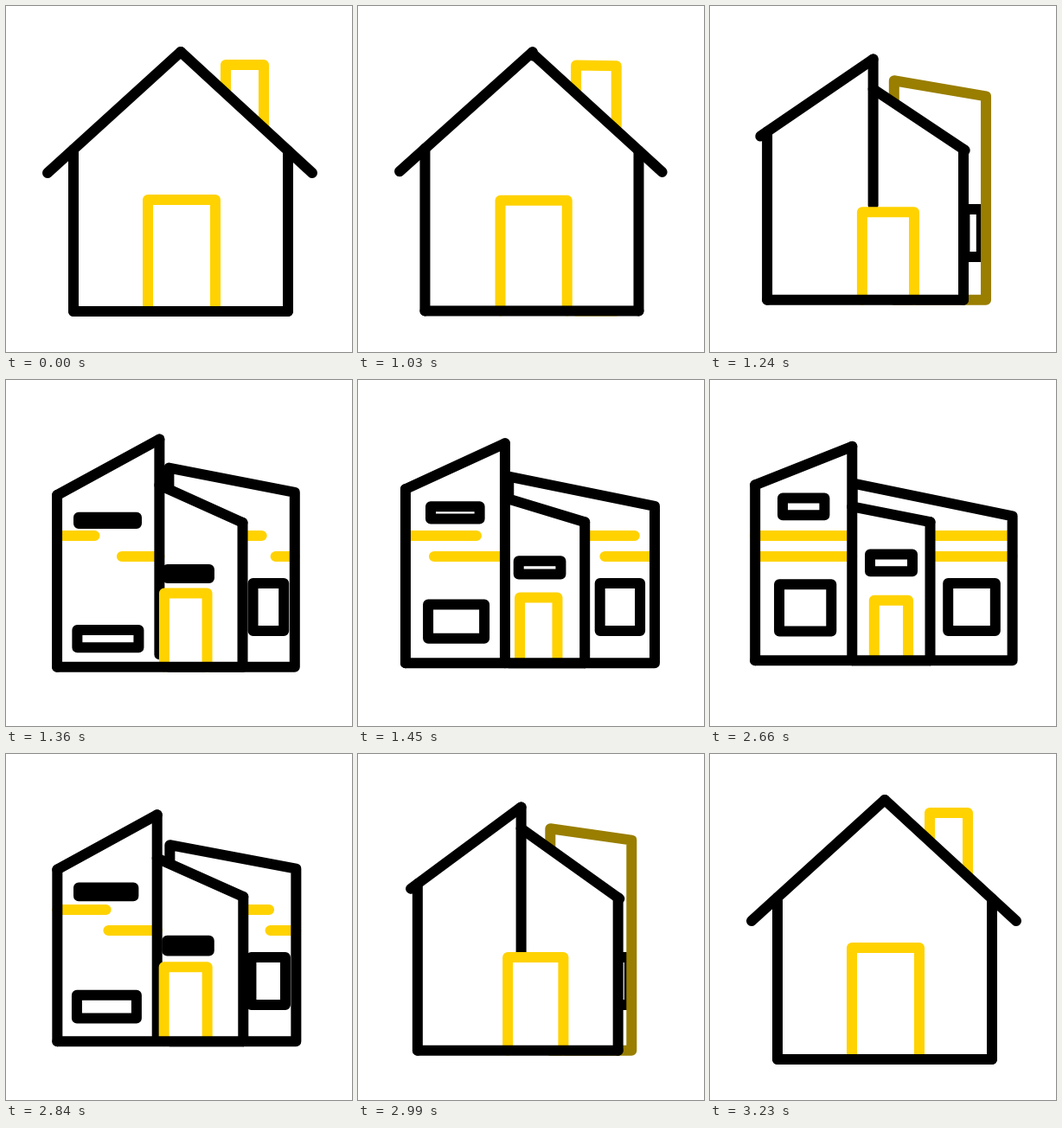
Write an HTML page that moves like this. It is 400 px wide and 400 px high and loops after 3260 ms.

```html
<!DOCTYPE html>
<html lang="en">
<head>
<meta charset="utf-8">
<title>House morph</title>
<style>
html, body { margin: 0; width: 100%; height: 100%; overflow: hidden; background: #fff; }
svg { display: block; width: 100vw; height: 100vh; }
path { fill: none; stroke: #000; stroke-width: 12; stroke-linecap: round; stroke-linejoin: round; }
.fill { fill: #fff; stroke: none; }
.gold { stroke: #ffd200; }
</style>
</head>
<body>
<svg viewBox="0 0 400 400">
  <path id="backFill" class="fill"/>
  <path id="backWindow"/>
  <path id="backStripes" class="gold"/>
  <path id="back"/>
  <path id="frontFill" class="fill"/>
  <path id="stripes" class="gold"/>
  <path id="column"/>
  <path id="windows"/>
  <path id="roof"/>
  <path id="walls"/>
  <path id="door" class="gold"/>
  <path id="floor"/>
</svg>
<script>
const LOOP = 3260, STEP = 30, STEPS = 20, OPEN = 1000, CLOSE = 2630;
const el = {};
document.querySelectorAll('path').forEach(p => el[p.id] = p);

const clamp = x => Math.min(1, Math.max(0, x));
const ease = x => { x = clamp(x); return x * x * (3 - 2 * x); };
const mix = (a, b, k) => a + (b - a) * k;
const line = (...pts) => 'M' + pts.map(p => p[0].toFixed(2) + ' ' + p[1].toFixed(2)).join('L');
const box = (cx, cy, w, h) => {
  const l = cx - w / 2, r = cx + w / 2, t = cy - h / 2, b = cy + h / 2;
  return line([l, t], [r, t], [r, b], [l, b]) + 'Z';
};
const draw = (id, d) => el[id].setAttribute('d', d);

// u: 0 = cottage, 1 = modern building
function pose(u, opening) {
  const e = ease(u);
  const p = opening ? ease(Math.pow(u, 0.82)) : e;
  const m = (e + p) / 2;
  const s = ease(Math.pow(clamp((u - 0.4) / 0.6), 0.81));

  const base = mix(353, 324, p);
  const apex = [mix(202, 164, e), mix(53, 77, e)];
  const left = [mix(78, 52, p), mix(165.7, 121, p)];
  const right = [mix(326, 254, p), mix(167.2, 164, p)];
  const ridge = [apex[0], mix(53, 147, p)];
  const eave = (from, to, over) => {
    const k = 1 + over / Math.abs(to[0] - from[0]);
    return [mix(from[0], to[0], k), mix(from[1], to[1], k)];
  };

  // chimney that grows into the rear wing
  const bl = mix(254, 164, p), br = mix(298, 350, m);
  const rear = line([bl, mix(68, 119.8, e)], [br, mix(68, 158, m)], [br, base], [bl, base]) + 'Z';
  const dark = 1 - clamp((u - 0.28) / 0.3);
  draw('backFill', rear);
  draw('back', rear);
  el.back.style.stroke = `rgb(${Math.round(255 * dark)},${Math.round(210 * dark)},0)`;
  draw('backWindow', box(mix(305, 302.5, e), 262.5, 55 * e, 55));

  const stripePair = (l, r) =>
    line([l, 180], [mix(l, r, s), 180]) + line([mix(r, l, s), 204], [r, 204]);
  draw('backStripes', s ? stripePair(right[0], br) : '');
  draw('stripes', s ? stripePair(left[0], apex[0]) : '');

  draw('frontFill', line([left[0], base], left, apex, ridge, right, [right[0], base]) + 'Z');
  draw('column', line(apex, [apex[0], mix(apex[1], base, ease(u / 0.7))]));
  const q = 1 - s;
  draw('windows', s ? box(108 + 15 * q, 146 + 26 * q, 48 + 30 * q, 20 * s)
    + box(110 + 12.5 * q, 262.5 + 58 * q, 60 + 17.5 * q, 55 * s)
    + box(209.5 + 2 * q, 211 + 20.6 * q, 49 - q, 4 + 16 * s) : '');
  el.windows.style.strokeWidth = 12 * clamp(s / 0.2);

  draw('roof', line(eave(apex, left, 30 * (1 - ease(u / 0.6))), apex)
    + line(ridge, eave(ridge, right, 28 * (1 - ease(u / 0.47)))));
  draw('walls', line(left, [left[0], base]) + line(right, [right[0], base]));

  const dl = mix(164, 190, p), dr = mix(242, 229, p), dt = mix(224, 255, p);
  draw('door', line([dl, base], [dl, dt], [dr, dt], [dr, base]));
  draw('floor', line([left[0], base], [right[0], base]));
}

function frame(now) {
  const t = now % LOOP;
  const progress = start => clamp(Math.floor((t - start) / STEP + 1e-6) / STEPS);
  const opening = t < CLOSE;
  pose(opening ? progress(OPEN) : 1 - progress(CLOSE), opening);
}

let start = null;
function tick(now) {
  if (start === null) start = now;
  frame(now - start);
  requestAnimationFrame(tick);
}
frame(0);
requestAnimationFrame(tick);
</script>
</body>
</html>
```
